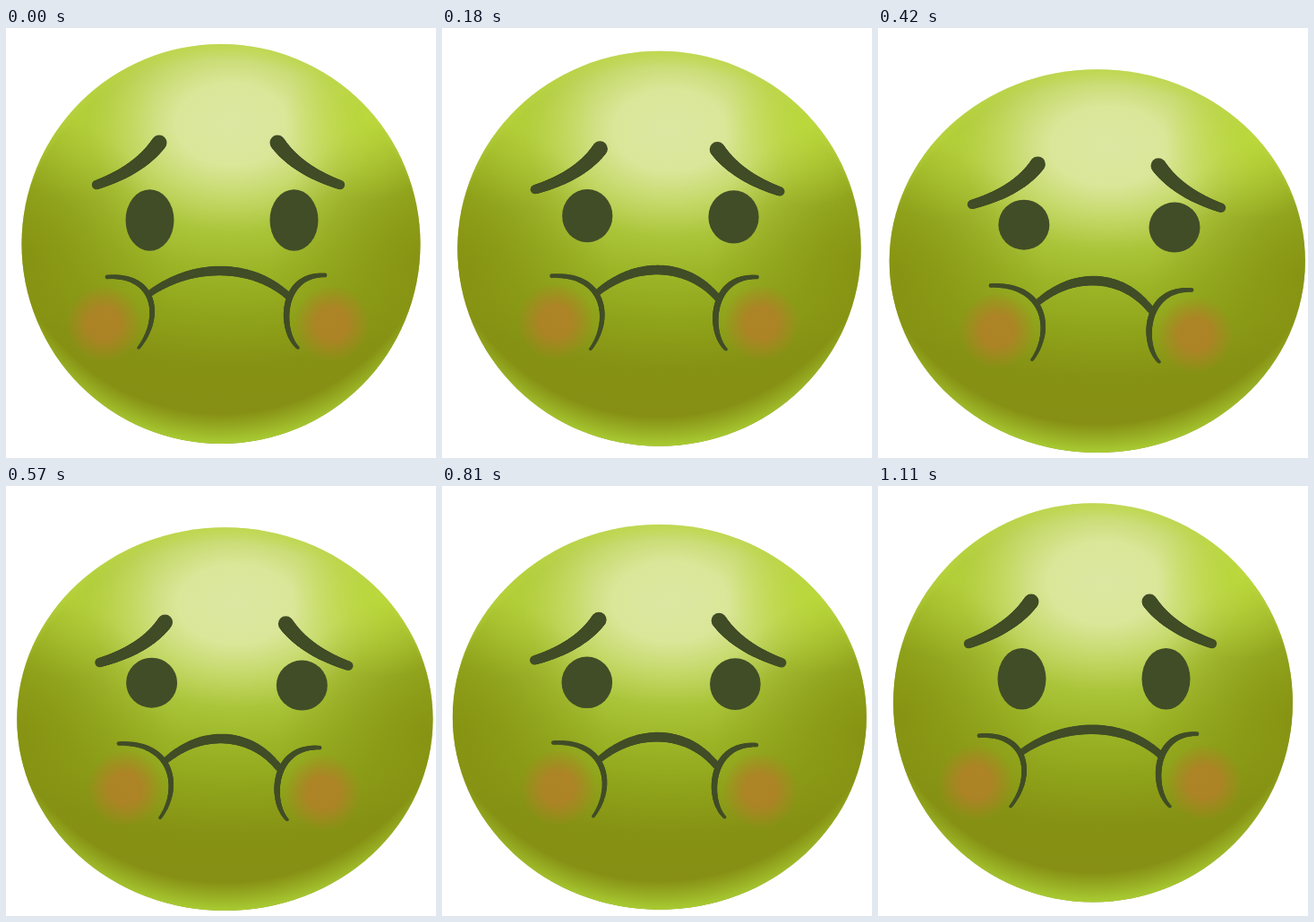
An HTML page with a canvas that plays this animation: 480x480 px, repeating every 1.26 s.

```html
<!DOCTYPE html>
<html>
<head>
<meta charset="utf-8">
<style>
html, body { margin: 0; height: 100%; overflow: hidden; background: #fff; }
canvas { display: block; width: 100vmin; height: 100vmin; }
</style>
</head>
<body>
<canvas id="stage" width="480" height="480"></canvas>
<script>
const ctx = document.getElementById('stage').getContext('2d');
const DARK = '#414d27', LOOP = 1260, STEP = 30, REST = 1110;

// Eased 0 to 1 between times a and b
function ease(t, a, b) {
  const u = Math.min(1, Math.max(0, (t - a) / (b - a)));
  return u * u * (3 - 2 * u);
}

// Rises to 1 at the peak, then sinks back until rest
function sway(t, peak) {
  return ease(t, 0, peak) * Math.cos(Math.PI / 2 * Math.max(0, t - peak) / (REST - peak));
}

function pose(t) {
  const release = ease(t, 725, 1100);
  const hop = t < 200 ? 12 * Math.sin(Math.PI * t / 200) ** 2 : 0;
  return {
    squeeze: ease(t, 0, 270) - release,
    drop: 23.5 * (ease(t, 100, 310) - release) - hop + t / REST,
    left: 4.5 * sway(t, 280),
    right: 10 * sway(t, 400)
  };
}

function radial(x, y, r, stops) {
  const g = ctx.createRadialGradient(x, y, 0, x, y, r);
  stops.forEach(([p, color]) => g.addColorStop(p, color));
  return g;
}

// Soft spot of one colour, full up to the inner share of its radius
function glow(x, y, r, rgb, alpha, inner = 0) {
  return radial(x, y, r, [[inner, `rgba(${rgb},${alpha})`],
    [(1 + inner) / 2, `rgba(${rgb},${alpha / 2})`], [1, `rgba(${rgb},0)`]]);
}

function disc(x, y, rx, ry = rx) {
  ctx.beginPath();
  ctx.ellipse(x, y, rx, ry, 0, 0, 2 * Math.PI);
  ctx.fill();
}

// Cubic stroke whose radius goes from r0 to r1 with a bulge in the middle
function brush(p, r0, r1, bulge = 0) {
  const n = 90;
  for (let i = 0; i <= n; i++) {
    const t = i / n, s = 1 - t;
    const at = k => s * s * s * p[0][k] + 3 * s * s * t * p[1][k]
      + 3 * s * t * t * p[2][k] + t * t * t * p[3][k];
    disc(at(0), at(1), r0 + (r1 - r0) * t + bulge * Math.sin(Math.PI * t));
  }
}

function body(cx, cy, rx, ry) {
  ctx.save();
  ctx.translate(cx, cy);
  ctx.scale(rx, ry);
  ctx.beginPath();
  ctx.arc(0, 0, 1, 0, 2 * Math.PI);
  ctx.clip();
  const fill = style => {
    ctx.fillStyle = style;
    ctx.fillRect(-1.5, -1.5, 3, 3);
  };

  ctx.save();
  ctx.scale(1.35, 1);
  fill(radial(.04, -.6, 1.5, [[0, '#dce8a2'], [.14, '#dae698'], [.25, '#c4d868'],
    [.36, '#abc53a'], [.5, '#9bb426'], [.65, '#8fa31a'], [.8, '#869214'], [1, '#868f14']]));
  ctx.restore();

  for (const side of [-1, 1]) {
    fill(glow(side, .08, .75, '134,146,18', .9));
    fill(glow(side * .74, -.64, .42, '188,218,56', side > 0 ? .85 : .5));
  }
  fill(radial(0, -.25, 1.25, [[.88, 'rgba(169,204,51,0)'], [1, 'rgb(169,204,51)']]));
  fill(radial(0, .1, 1.1, [[.93, 'rgba(190,218,70,0)'], [1, 'rgba(190,218,70,.6)']]));
  ctx.restore();
}

function brow(x, y, dir, inDx, outDx, outDy = 0) {
  const inner = [x + inDx, y], outer = [x + dir * 70 + outDx, y + 47 + outDy];
  const bend = [x + dir * 22 + inDx, y + 30.5];
  const ctrl = end => end.map((v, k) => (v + 2 * bend[k]) / 3);
  brush([inner, ctrl(inner), ctrl(outer), outer], 8.5, 5.2);
}

function cheek([x, y]) {
  ctx.fillStyle = glow(x, y, 43, '176,129,39', .9, .4);
  disc(x, y, 43);
}

function draw(t) {
  const { squeeze: q, drop, left, right } = pose(t);
  const tilt = .6 * right, browY = 128 + drop, eyeY = 214.5 + .78 * drop - 13.5 * q;
  const mouthY = .75 * drop - 8.4 * q;
  const at = (x, y, pull) => [x + pull * q, y + mouthY + tilt * (x - 113) / 243];

  ctx.clearRect(0, 0, 480, 480);
  body(240 + (left + right) / 3, 241 + .8 * drop, 222.5 + .4 * drop, 223 - .38 * drop);
  cheek(at(109, 330 - 2 * q, 24));
  cheek(at(364, 330 - 3 * q, -10));

  ctx.fillStyle = DARK;
  brow(171, browY, -1, left * 1.7, left * .9, -2 * q);
  brow(303, browY + tilt * .3, 1, right, right);
  const rx = 27 + 1.5 * q, ry = 34.3 - 6.3 * q;
  disc(160.5 + left * .55, eyeY, rx, ry);
  disc(321.5 + right * .95, eyeY + tilt * .5, rx, ry);

  brush([at(161, 296, 17), at(208, 263 - 2 * q, 9), at(273, 261 - 2 * q, -2), at(316, 300, -11.5)], 3.5, 4, 1.6);
  brush([at(113, 278, 13), at(169, 274, 18), at(174, 325 + 2 * q, 22), at(148, 357 + 3 * q, 24)], 2.4, 1.8, .9);
  brush([at(356, 276 + q, -6), at(306, 274 + q, -9), at(305, 338 + q, -11), at(326, 357 + q, -12)], 2.4, 1.8, 1.3);
}

function frame(now) {
  const t = now % LOOP;
  draw(Math.min(REST, Math.floor(t / STEP) * STEP));
  requestAnimationFrame(frame);
}
requestAnimationFrame(frame);
</script>
</body>
</html>
```
